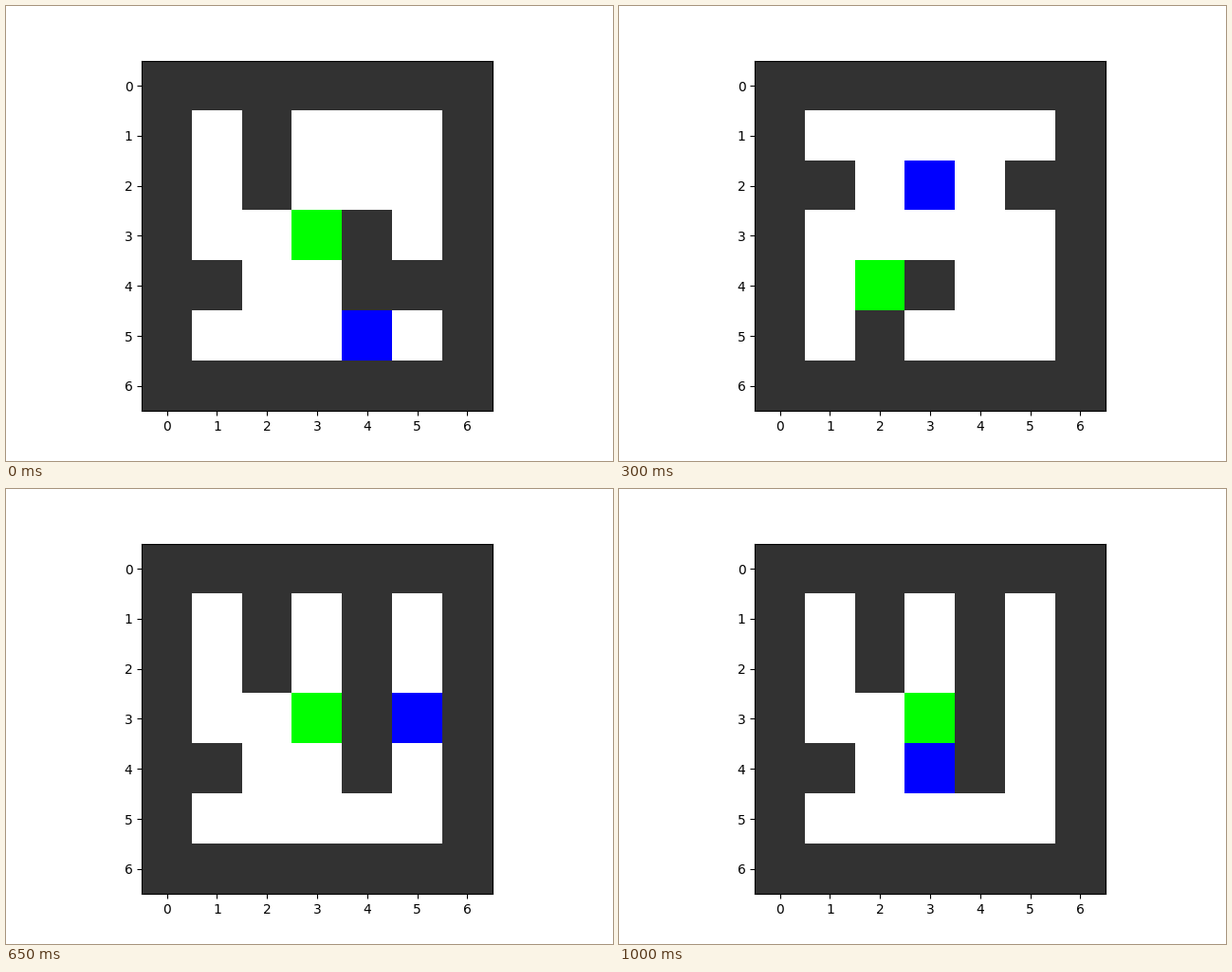
These frames come from a looping animation (640x480 px, 1100 ms). A matplotlib script:

```python
import numpy as np
import matplotlib.pyplot as plt
from matplotlib.animation import FuncAnimation

STEP_MS = 50
WALL, FLOOR = (50, 50, 50), (255, 255, 255)
GOAL, AGENT = (0, 255, 0), (0, 0, 255)

# Each episode: inner rows of the maze ('#' wall), goal (x, y),
# start (x, y) and the moves taken; '.' is a bump that leaves the agent in place.
EPISODES = [
    ("#...# .#... .#... ...#. #..## .....", (3, 3), (4, 5), "LU."),
    ("#...# .#... .##.. .#... .#..# .....", (4, 4), (3, 3), "D"),
    ("#...# ..... #...# ..... ..#.. .#...", (2, 4), (3, 2), "D.L"),
    ("#...# .#.#. .#.#. ...#. #..#. .....", (3, 3), (5, 2), "UDD.DDL.LU."),
]
MOVES = {"L": (-1, 0), "R": (1, 0), "U": (0, -1), "D": (0, 1), ".": (0, 0)}


def draw_maze(rows, goal):
    grid = np.full((7, 7, 3), WALL, dtype=np.uint8)
    for y, row in enumerate(rows.split()[1:], start=1):
        for x, cell in enumerate(row, start=1):
            if cell == ".":
                grid[y, x] = FLOOR
    grid[goal[1], goal[0]] = GOAL
    return grid


def play(rows, goal, start, moves):
    maze = draw_maze(rows, goal)
    x, y = start
    for move in "." + moves:
        dx, dy = MOVES[move]
        x, y = x + dx, y + dy
        view = maze.copy()
        view[y, x] = AGENT
        yield view


views = [view for episode in EPISODES for view in play(*episode)]

fig, ax = plt.subplots(figsize=(6.4, 4.8), dpi=100)
image = ax.imshow(views[0], interpolation="nearest")
ax.set_xticks(range(7))
ax.set_yticks(range(7))


def update(i):
    image.set_data(views[i])
    return [image]


anim = FuncAnimation(fig, update, frames=len(views), interval=STEP_MS,
                     repeat=True, repeat_delay=0)
plt.show()
```
